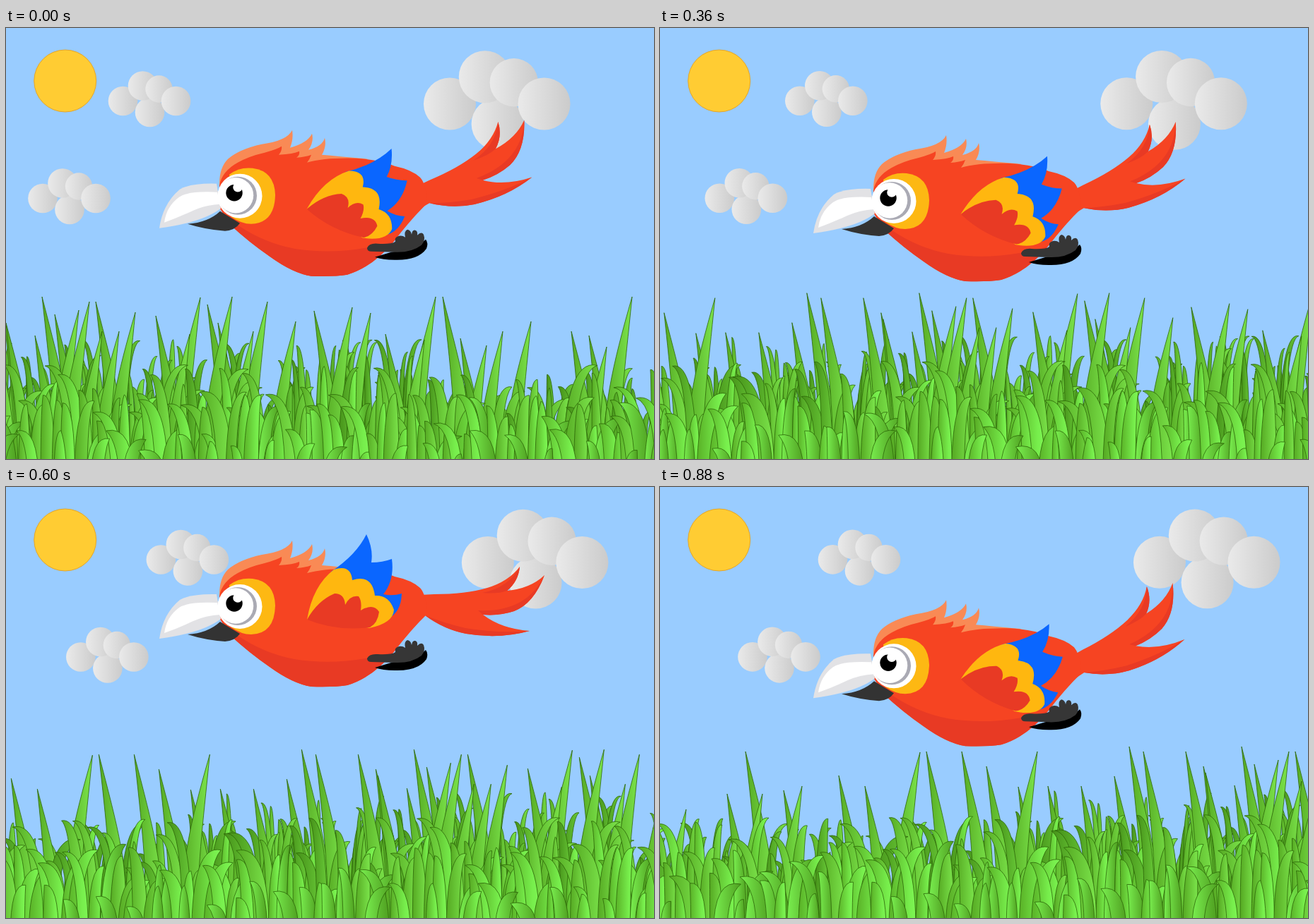
An HTML page that plays this animation: 917 by 611 pixels, repeating every 0.92 s.

```html
<!DOCTYPE html>
<html lang="en">
<head>
<meta charset="utf-8">
<title>Flying parrot</title>
<style>
html, body { margin: 0; width: 100%; height: 100%; overflow: hidden; background: #99ccff; }
svg { display: block; width: 917px; height: 611px; }
</style>
</head>
<body>
<svg viewBox="0 0 917 611" width="917" height="611">
  <defs>
    <linearGradient id="puff"><stop stop-color="#eaeaea"/><stop offset="1" stop-color="#cbcbcb"/></linearGradient>
    <linearGradient id="g0"><stop stop-color="#458f18"/><stop offset="1" stop-color="#68ca38"/></linearGradient>
    <linearGradient id="g1"><stop stop-color="#55a822"/><stop offset="1" stop-color="#7ce64c"/></linearGradient>
    <linearGradient id="g2"><stop stop-color="#59b026"/><stop offset=".75" stop-color="#77ee4c"/><stop offset="1" stop-color="#7ef654"/></linearGradient>
    <linearGradient id="g3"><stop stop-color="#7af050"/><stop offset="1" stop-color="#4f9f20"/></linearGradient>
    <g id="cloud" fill="url(#puff)">
      <circle r="20.8"/><circle cx="38" cy="16" r="20.8"/><circle cx="28" cy="-21.5" r="20.8"/>
      <circle cx="51" cy="-17" r="19.2"/><circle cx="75" r="20.8"/>
    </g>
  </defs>
  <rect width="917" height="611" fill="#99ccff"/>
  <circle cx="83.7" cy="75" r="44" fill="#ffcc33" stroke="#e3a52c"/>
  <g id="clouds">
    <use href="#cloud" x="165.5" y="103.5"/>
    <use href="#cloud" x="52" y="241.5"/>
    <use href="#cloud" transform="translate(628 107.5) scale(1.78)"/>
  </g>
  <g id="bird">
    <g id="tail">
      <path fill="#f64422" d="M575 153Q592 153 606 152Q650 152 681 143Q711 134 727 113Q725 134 709 147Q742 144 762 125Q747 165 719 176Q698 183 675 181Q701 201 741 204Q698 216 651 208Q620 202 593 182L575 184Z"/>
      <path fill="#e83a24" d="M727 113Q725 134 709 147Q696 152 674 150Q711 143 727 113ZM762 125Q747 165 719 176Q698 183 675 181L668 175Q737 178 762 125ZM593 182Q620 193 650 200Q700 208 741 204Q698 216 651 208Q620 202 593 182Z"/>
    </g>
    <path fill="#f98a55" d="M302 152Q302 129 314 117Q330 103 362 96Q398 91 405 76Q407 89 402 101Q427 94 433 81Q436 93 428 104Q448 99 451 87Q454 99 447 111Q470 113 512 117L440 140L310 160Z"/>
    <path fill="#f64422" d="M302 154Q306 134 328 122Q344 113 366 108Q384 103 390 99Q391 105 386 111Q407 110 415 106Q416 112 411 115Q424 114 432 111Q430 117 426 122Q450 115 495 116Q530 118 550 127Q574 132 586 143Q595 153 596 180Q574 201 548 235Q519 270 483 281Q465 284 432 283Q406 279 373 255Q344 235 317 210L302 186Z"/>
    <path fill="#e83a24" d="M317 210L327 210Q365 236 408 244Q475 255 548 234Q519 270 483 281Q465 284 432 283Q406 279 373 255Q344 235 317 210Z"/>
    <path fill="#fdb813" d="M316 139Q330 128 349 130Q380 134 381 168Q380 208 347 209Q333 209 319 199Z"/>
    <path fill="#333" d="M257 209Q286 207 303 191Q321 202 331 208Q324 218 310 219Q282 217 257 209Z"/>
    <path fill="#e2e2e5" d="M217 215Q222 180 246 160Q262 151 298 152L304 187Q278 207 217 215Z"/>
    <path fill="#fff" d="M224 207Q227 184 245 171Q258 162 299 164L303 181Q283 182 265 190Q244 200 224 207Z"/>
    <circle cx="331" cy="169.500" r="31.500" fill="#fff"/>
    <circle cx="328" cy="169" r="27" fill="#aaaab4"/>
    <circle cx="325" cy="168.500" r="25.200" fill="#fff"/>
    <circle cx="323" cy="165" r="11.700"/>
    <circle cx="328" cy="157" r="6.800" fill="#fff"/>
    <g id="wing">
      <path fill="#0a66ff" d="M460 120Q496 96 510 67Q520 88 517 107Q533 107 546 102Q550 132 534 152Q547 155 560 151Q559 179 539 187L500 170Z"/>
      <path fill="#ffb70f" d="M426 188Q434 140 464 117Q488 109 490 132Q518 123 522 154Q542 153 549 174Q548 193 514 200L470 190Z"/>
      <path fill="#e83a24" d="M426 188Q441 161 465 151Q479 151 480 167Q487 153 499 155Q504 162 502 175Q520 164 528 177Q526 193 515 199Q468 205 426 188Z"/>
    </g>
    <path d="M522 256L545 249Q580 245 594 231Q598 236 595 244Q583 261 550 260Q533 260 522 256Z"/>
    <path fill="#363636" d="M511 243Q514 236 526 237Q546 238 551 234Q549 228 556 226Q561 225 565 228Q563 219 568 217Q573 218 574 224Q575 217 579 218Q583 219 582 225Q588 219 591 224Q594 232 588 239Q574 250 550 249L517 248Q511 248 511 243Z"/>
  </g>
  <g id="grass" stroke="#2c6608" stroke-width=".8" stroke-linejoin="round"></g>
</svg>
<script>
const el = id => document.getElementById(id);
const STEP = 40, STEPS = 23, BASE = 645;

// Tips of the tall blades as x, y pairs, by the side they bend to.
const leftTips = [
  -677,448, -651,388, -597,443, -519,422, -482,437, -395,388, -345,388, -310,409, -265,438,
  -223,437, -176,437, -129,423, -108,381, -88,388, -28,388, -3,409, 51,381, 69,406, 127,388,
  212,408, 285,392, 436,401, 618,381, 800,430, 0,418, 41,436, 300,418, 537,434, 643,440, 825,436
];
const rightTips = [
  -735,470, -627,448, -571,437, -404,389, -238,388, 103,400, 118,388, 183,403, 275,382, 320,381,
  370,388, 410,416, 490,396, 516,404, 608,381, 703,430, 743,416, 886,381, 136,430, 160,430,
  260,434, 350,430, 592,442, 680,450, 850,452
];

let seed = 20;
const rnd = (a = 0, b = 1) => {
  seed = (seed * 16807) % 2147483647;
  return a + (b - a) * seed / 2147483647;
};

let html = "";
const put = (d, fill) => { html += `<path fill="url(#g${fill})" d="${d}Z"/>`; };

function tall(x, y, dir) {
  const h = BASE - y, foot = x - dir * h * .115, w = 11 + h * .05;
  const bend = foot + (x - foot) * .35, l = foot - w / 2, r = foot + w / 2;
  put(`M${l} ${BASE}C${l} ${BASE - h * .4} ${bend - w * .36} ${BASE - h * .62} ${x} ${y}` +
      `C${bend + w * .36} ${BASE - h * .58} ${r} ${BASE - h * .4} ${r} ${BASE}`, 1);
}

// A short blade arching over towards its tip.
function arch(foot, y, reach, w, fill) {
  const x = foot + reach, top = y - Math.abs(reach) * .3, l = foot - w / 2, r = foot + w / 2;
  const inner = top + w * 1.3;
  put(`M${l} ${BASE}Q${l} ${reach > 0 ? top : inner} ${x} ${y}Q${r} ${reach > 0 ? inner : top} ${r} ${BASE}`, fill);
}

function row(gap, lo, hi, reach, w0, w1, fills) {
  for (let x = -815; x < 950; x += rnd(gap * .6, gap * 1.4))
    arch(x, rnd(lo, hi), rnd(-reach, reach), rnd(w0, w1), fills[Math.floor(rnd(0, fills.length))]);
}

function pairs(list, dir) {
  for (let i = 0; i < list.length; i += 2) tall(list[i], list[i + 1], dir);
}

function grow() {
  row(9, 482, 565, 34, 9, 15, [0, 0, 1]);
  for (let i = 0; i < 110; i++) {
    const x = i % 3 ? rnd(-260, 340) : rnd(400, 570);
    arch(x, rnd(440, 515), rnd(-26, 26), rnd(7, 12), i % 2);
  }
  pairs(leftTips, -1);
  pairs(rightTips, 1);
  row(12, 478, 555, 42, 11, 18, [1, 1, 2, 0]);
  row(14, 515, 580, 36, 14, 23, [2, 2, 1, 3]);
  row(42, 568, 605, 30, 14, 22, [2, 3]);
  el("grass").innerHTML = html;
}

// Height of the bird: 0 at the top of a wing beat, 1 at the bottom.
function dip(n) {
  if (n < 4) return .815 * (1 - n / 4);
  const k = (n - 4) % 11;
  return k <= 7 ? Math.sin(Math.PI / 2 * k / 7) : (11 - k) / 4;
}

function draw(ms) {
  const n = Math.floor(ms / STEP) % STEPS, p = dip(n), turn = p ** .82;
  el("clouds").setAttribute("transform", `translate(${n * 3.59} ${-n * .03})`);
  el("grass").setAttribute("transform", `translate(${n * 35.09} ${-n * .59})`);
  el("bird").setAttribute("transform", `translate(0 ${p * 84.3})`);
  el("tail").setAttribute("transform", `rotate(${-26.8 * turn} 590 165)`);
  el("wing").setAttribute("transform", `rotate(${23.3 * turn} 426 187)`);
}

grow();
draw(0);
let start;
function tick(now) {
  start ??= now;
  draw(now - start);
  requestAnimationFrame(tick);
}
requestAnimationFrame(tick);
</script>
</body>
</html>
```
